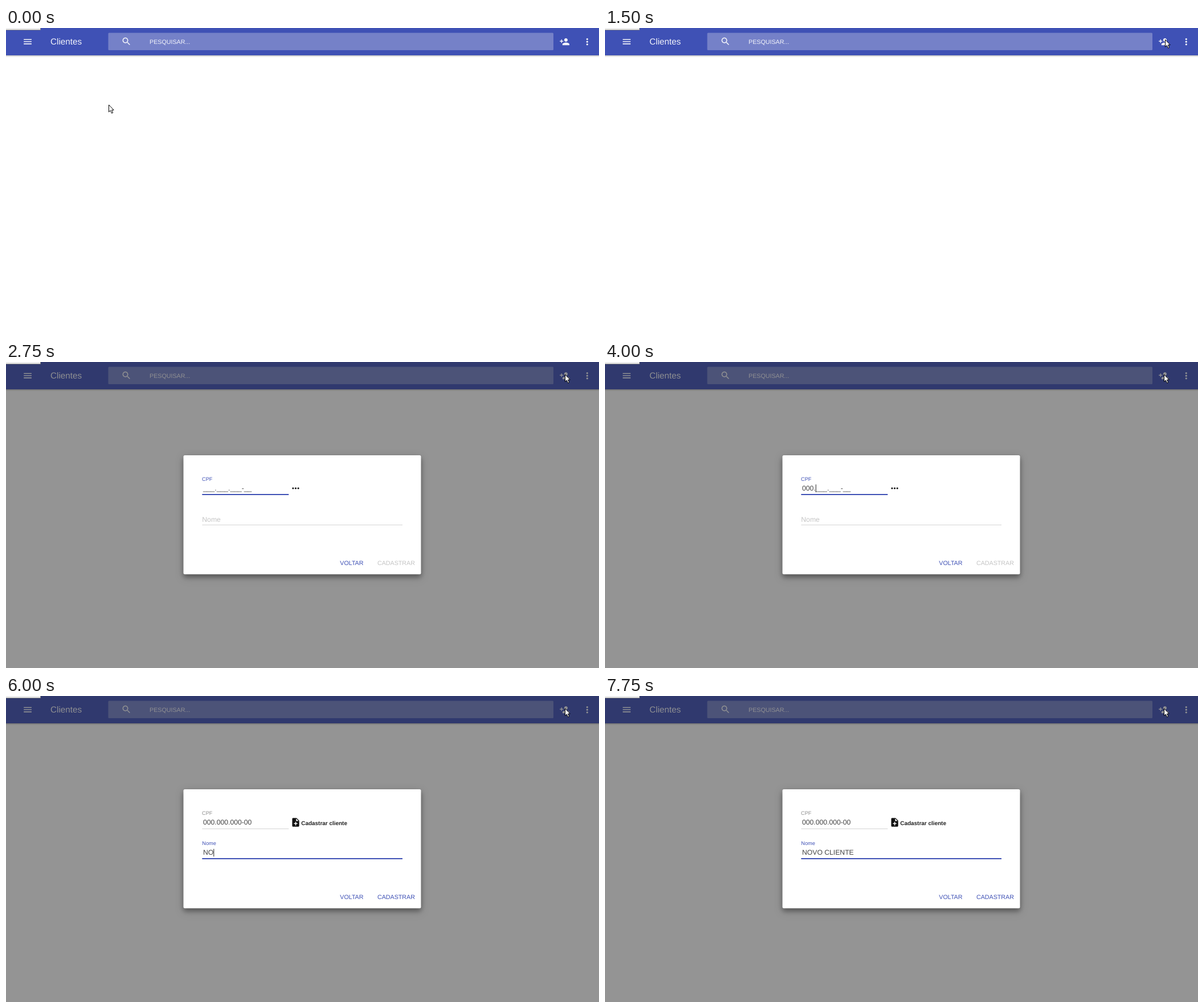
Animation, 1041 px wide and 538 px high, one loop 8000 ms. Source, as an HTML page:

```html
<!DOCTYPE html>
<html lang="pt">
<head>
<meta charset="utf-8">
<title>Clientes</title>
<style>
  html, body { margin: 0; width: 100%; height: 100%; overflow: hidden; background: #fff; }
  svg { display: block; width: 1041px; height: 538px; }
  text { font: 12.2px "Liberation Sans", Arial, sans-serif; text-rendering: geometricPrecision; white-space: pre; }
  .title { font-size: 15.25px; }
  .button { font-size: 10.7px; }
  .label { font-size: 9.2px; }
  .bold { font-size: 9.95px; font-weight: bold; }
  .bar { filter: drop-shadow(0 1.5px 1.5px rgba(0, 0, 0, .35)); }
  .card { filter: drop-shadow(0 5px 4px rgba(0, 0, 0, .32)) drop-shadow(0 3px 7px rgba(0, 0, 0, .18)); }
</style>
</head>
<body>
<svg viewBox="0 0 1041 538">
  <defs>
    <g id="dots"><circle cx="-4.6" r="1.6"/><circle r="1.6"/><circle cx="4.6" r="1.6"/></g>
  </defs>

  <rect class="bar" x="-9" y="-9" width="1059" height="57" fill="#3f51b5"/>
  <rect x="179.5" y="8.5" width="781.5" height="30.5" rx="1.5" fill="#7581c8"/>
  <g fill="#fff" fill-opacity=".93">
    <path transform="translate(28.9 14.9) scale(.7625)" d="M3 18h18v-2H3zM3 13h18v-2H3zM3 6v2h18V6z"/>
    <path transform="translate(202.3 14.5) scale(.7625)" d="M15.5 14h-.79l-.28-.27C15.41 12.59 16 11.11 16 9.5 16 5.91 13.09 3 9.5 3S3 5.91 3 9.5 5.91 16 9.5 16c1.61 0 3.09-.59 4.23-1.57l.27.28v.79l5 4.99L20.49 19zm-6 0C7.01 14 5 11.99 5 9.5S7.01 5 9.5 5 14 7.01 14 9.5 11.99 14 9.5 14z"/>
    <circle id="ripple" cx="980.5" cy="24" r="13.5" fill="#aaa" fill-opacity=".2"/>
    <path transform="translate(971.5 14.9) scale(.7625)" d="M15 12c2.21 0 4-1.79 4-4s-1.79-4-4-4-4 1.79-4 4 1.79 4 4 4zM6 10V7H4v3H1v2h3v3h2v-3h3v-2zm9 4c-2.67 0-8 1.34-8 4v2h16v-2c0-2.66-5.33-4-8-4z"/>
    <use href="#dots" transform="translate(1020.3 24.2) rotate(90)"/>
    <text class="title" x="78" y="29">Clientes</text>
    <text class="button" x="252" y="27.5">PESQUISAR...</text>
  </g>

  <rect id="backdrop" width="1041" height="538" fill="#212121" fill-opacity=".48"/>
  <path d="M0 0H60V3H0z" fill="#ececec"/>
  <path d="M0 3.5H60.5V0" fill="none" stroke="#8b8b8b"/>

  <g id="dialog">
    <rect class="card" x="311.5" y="164" width="417" height="209.3" rx="2.5" fill="#fff"/>
    <text id="cpfLabel" class="label" x="344" y="208.5">CPF</text>
    <text id="cpf" x="346" y="226.3"></text>
    <rect id="cpfLine" x="344.3" width="152"/>
    <use id="waiting" href="#dots" x="508.5" y="222" fill="#111"/>
    <g id="morph" fill="#111"><ellipse cx="507" cy="221.8" rx="3" ry="1.9"/><circle cx="513.2" cy="222" r="1.2"/></g>
    <path id="newNote" fill="#111" transform="translate(499.4 212.9) scale(.7625)" d="M14 2H6c-1.1 0-1.99.9-1.99 2L4 20c0 1.1.89 2 1.99 2H18c1.1 0 2-.9 2-2V8zm2 14h-3v3h-2v-3H8v-2h3v-3h2v3h3zm-3-7V3.5L18.5 9z"/>
    <text id="hint" class="bold" x="518.3" y="227.3" fill="#222">Cadastrar cliente</text>
    <text id="nameLabel" x="344.3"  >Nome</text>
    <text id="name" x="346" y="279.4" fill="#444"></text>
    <rect id="nameLine" x="344.3" width="351.7"/>
    <rect id="caret" width="1" height="13.5" fill="#222"/>
    <text class="button" x="586.3" y="357" fill="#3f51b5">VOLTAR</text>
    <text id="submit" class="button" x="652" y="357">CADASTRAR</text>
  </g>

  <path id="cursor" d="M.5 .5V13.2L3.4 10.5 5.5 15.4 7.6 14.5 5.6 9.7H9.2z" fill="#fff" stroke="#000"/>
</svg>

<script>
const LOOP = 8000, STEP = 250;
const BLUE = '#3f51b5', PALE = '#c4c4c4';
const MASK = '___.___.___-__', CPF = '000.000.000-00', NAME = 'NOVO CLIENTE';
const $ = id => document.getElementById(id);
const set = (id, attrs) => { for (const key in attrs) $(id).setAttribute(key, attrs[key]); };
const show = (id, visible) => set(id, { visibility: visible ? 'inherit' : 'hidden' });
const within = (t, from, to) => t >= from && t < to;
const bezier = (u, a, b, c) => (1 - u) ** 2 * a + 2 * u * (1 - u) * b + u * u * c;

// Characters present after steady typing from `first` to `total`.
const typed = (t, from, to, first, total) => t < from ? 0 :
  Math.min(total, Math.floor(first + (total - first) * (t - from) / (to - from)));

function underline(id, bottom, focused) {
  const height = focused ? 2 : 1;
  set(id, { y: bottom - height, height, fill: focused ? BLUE : '#d4d4d4' });
}

function moveCursor(t) {
  const u = Math.min(1, t / 1250);
  const parked = t >= 2750;
  const x = parked ? 981 : bezier(u, 180, 580, 983);
  const y = parked ? 21.5 : bezier(u, 134.5, 335, 20);
  set('cursor', { transform: `translate(${x} ${y})` });
}

function placeCaret(t, input, count, y) {
  const visible = within(t, 2250, 2750) || within(t, 3250, 5500) || within(t, 6000, 7500);
  show('caret', visible);
  const offset = count ? $(input).getSubStringLength(0, count) : 0;
  set('caret', { x: 346 + offset, y });
}

function draw(now) {
  const t = Math.floor(now % LOOP / STEP) * STEP;
  const open = t >= 1750, onCpf = within(t, 2000, 4750), onName = t >= 4750;

  moveCursor(t);
  show('backdrop', open);
  show('ripple', within(t, 1750, 2750));
  show('dialog', open);
  const scale = t < 2000 ? .98 : 1;
  set('dialog', {
    transform: `translate(520.2 268.6) scale(${scale}) translate(-520.2 -268.6)`,
    opacity: t < 2000 ? .96 : 1
  });

  const digits = t < 4000 ? typed(t, 3500, 4000, 1, 1) : typed(t, 4000, 4500, 4, CPF.length);
  $('cpf').textContent = CPF.slice(0, digits) + MASK.slice(digits);
  set('cpf', { fill: t < 2000 ? '#aaa' : '#444' });
  set('cpfLabel', { fill: onCpf ? BLUE : onName ? '#8e8e8e' : PALE });
  underline('cpfLine', 234, onCpf);

  show('waiting', t < 4750);
  show('morph', t === 4750);
  show('newNote', t >= 5000);
  show('hint', onName);

  const letters = typed(t, 6000, 7000, 2, NAME.length);
  $('name').textContent = NAME.slice(0, letters);
  set('nameLabel', { class: onName ? 'label' : '', y: onName ? 262 : 281, fill: onName ? BLUE : PALE });
  underline('nameLine', 287, onName);
  set('submit', { fill: letters ? BLUE : PALE });

  if (onName) placeCaret(t, 'name', letters, 268.8);
  else placeCaret(t, 'cpf', digits, 215.3);
}

const start = performance.now();
function tick() {
  draw(performance.now() - start);
  requestAnimationFrame(tick);
}
tick();
</script>
</body>
</html>
```
